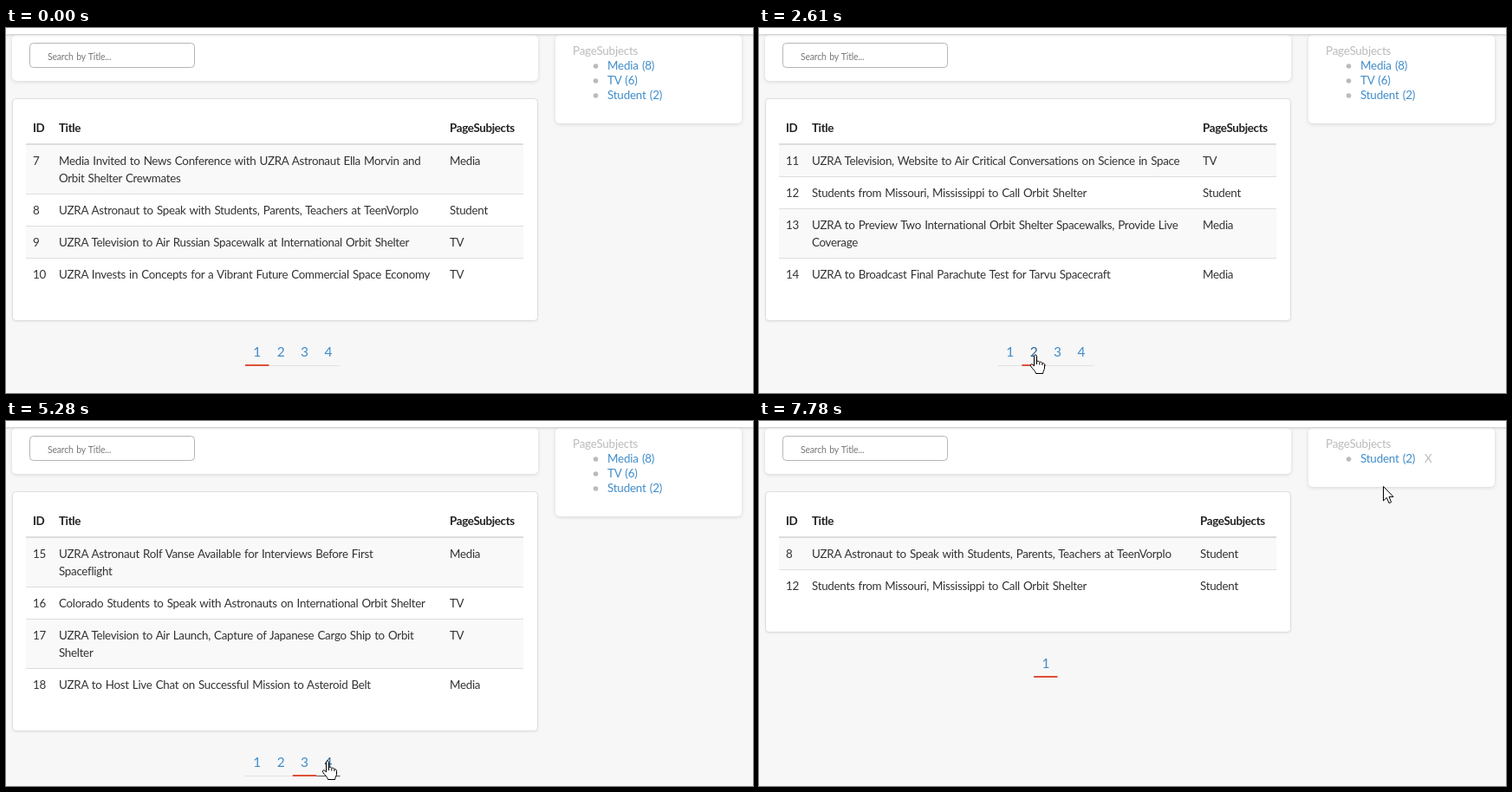
An HTML page that plays this animation: 862x421 px, repeating every 8000 ms.

```html
<!DOCTYPE html>
<html lang="en">
<head>
<meta charset="utf-8">
<title>Paged news table</title>
<style>
html, body { margin: 0; width: 100%; height: 100%; overflow: hidden; background: #f7f7f7; }
svg { display: block; }
text { font: 13.4px Lato, sans-serif; letter-spacing: -.3px; word-spacing: 1px; fill: #333; white-space: pre; }
.head { font-weight: 700; fill: #222; letter-spacing: -.35px; }
.hint { font-size: 10.5px; fill: #777; letter-spacing: -.2px; }
.muted { fill: #bbb; letter-spacing: -.2px; }
.link { fill: #3f8cca; letter-spacing: -.2px; }
.hover { fill: #2a6496; }
.page { font-size: 15.5px; text-anchor: middle; }
.card { fill: #fff; filter: drop-shadow(0 1px 2px #0002); }
.cursor { fill: #fff; stroke: #000; stroke-linejoin: round; }
</style>
</head>
<body>
<svg id="stage" width="862" height="421" viewBox="0 0 862 421"></svg>
<script>
const LOOP = 8000, STEP = 155.5, PER_PAGE = 4;
const stage = document.getElementById('stage');

// Keyword, then title with "|" as line break; ids count up from 7
const news = `
Media: Media Invited to News Conference with UZRA Astronaut Ella Morvin and|Orbit Shelter Crewmates
Student: UZRA Astronaut to Speak with Students, Parents, Teachers at TeenVorplo
TV: UZRA Television to Air Russian Spacewalk at International Orbit Shelter
TV: UZRA Invests in Concepts for a Vibrant Future Commercial Space Economy
TV: UZRA Television, Website to Air Critical Conversations on Science in Space
Student: Students from Missouri, Mississippi to Call Orbit Shelter
Media: UZRA to Preview Two International Orbit Shelter Spacewalks, Provide Live|Coverage
Media: UZRA to Broadcast Final Parachute Test for Tarvu Spacecraft
Media: UZRA Astronaut Rolf Vanse Available for Interviews Before First|Spaceflight
TV: Colorado Students to Speak with Astronauts on International Orbit Shelter
TV: UZRA Television to Air Launch, Capture of Japanese Cargo Ship to Orbit|Shelter
Media: UZRA to Host Live Chat on Successful Mission to Asteroid Belt
TV: UZRA Television to Air Launch of Global Ice-Measuring Satellite
Media: UZRA Invites Media to Witness Final Tarvu Parachute Test in Arizona|Desert
Media: UZRA Invites Media to View Spacecraft to Study the Frontier of Space
Media: UZRA Awards Contract for Earth Science Mission Hosting Services
`.trim().split('\n').map((line, i) => {
  const [keyword, title] = line.split(': ');
  return { id: i + 7, keyword, lines: title.split('|') };
});

const clicks = [
  { at: 0, page: 1 }, { at: 2450, page: 2 }, { at: 3390, page: 3 }, { at: 5590, page: 4 },
  { at: 6520, page: 1 }, { at: 7620, page: 1, keyword: 'Student' }];

// Pointer trips: start, end, destination x, y
const trips = [
  [0, 140, 728, 402], [140, 450, 420, 346], [450, 760, 319, 377],
  [1220, 1560, 364, 369], [1560, 2300, 319, 377], [2610, 3230, 343, 373],
  [3550, 4050, 348, 388], [4210, 5280, 371, 392], [5280, 6050, 291, 371], [6680, 7460, 720, 75]];

const viewAt = t => clicks.findLast(click => click.at <= t);
const smooth = p => p * p * (3 - 2 * p);

function pointerAt(t) {
  const time = 140 + STEP * Math.floor((t - 140) / STEP + .2);
  let x = 728, y = 450;
  for (const [start, end, toX, toY] of trips) {
    const p = smooth(Math.min(1, Math.max(0, (time - start) / (end - start))));
    x += (toX - x) * p;
    y += (toY - y) * p;
  }
  return [Math.round(x), Math.round(y)];
}

const text = (x, y, value, cls = '') => `<text x="${x}" y="${y}" class="${cls}">${value}</text>`;
const rect = (x, y, w, h, attrs) => `<rect x="${x}" y="${y}" width="${w}" height="${h}" ${attrs}/>`;
const card = (x, y, w, h) => rect(x, y, w, h, 'rx="5" class="card"');

function table(rows, keywordX) {
  let y = 134, body = '';
  rows.forEach(({ id, lines, keyword }, i) => {
    const height = 17 + 20 * lines.length;
    if (i % 2 === 0) body += rect(23, y, 574, height, 'fill="#f9f9f9"');
    if (i) body += rect(23, y, 574, 1, 'fill="#ddd"');
    body += text(31, y + 24, id) + text(keywordX, y + 24, keyword);
    lines.forEach((line, n) => body += text(61, y + 24 + 20 * n, line));
    y += height;
  });
  const bottom = y + 36;
  const frame = rect(7.5, 81.5, 606, bottom - 82, 'rx="4" fill="#fff" stroke="#ddd" style="filter:drop-shadow(0 1px 1px #0001)"');
  const head = text(31, 120, 'ID', 'head') + text(61, 120, 'Title', 'head') +
    text(keywordX, 120, 'PageSubjects', 'head');
  return { bottom, svg: frame + head + body + rect(23, 133, 574, 2, 'fill="#ddd"') };
}

function pager(count, active, pressed, bottom, isOver) {
  const width = 27.4, left = 330.8 - count * width / 2;
  let svg = rect(left, bottom + 51, count * width, 1, 'fill="#e2e2e2"'), over = false;
  for (let n = 1; n <= count; n++) {
    const x = left + (n - 1) * width;
    const hover = isOver(x, bottom + 22, width, 30);
    over ||= hover;
    svg += text(x + width / 2, bottom + 41, n, 'page link' + (hover ? ' hover' : ''));
    if (n === active) svg += rect(x, bottom + 50, width, 2, 'fill="#df4f38"');
    else if (hover) svg += rect(x, bottom + 51, width, 1, `fill="${n === pressed ? '#c0695c' : '#555'}"`);
  }
  return { svg, over };
}

function sidebar(keywords, isOver) {
  let over = false;
  let svg = card(634, 8, 215, 51 + 17 * keywords.length) + text(654, 31, 'PageSubjects', 'muted');
  keywords.forEach((keyword, i) => {
    const y = 48 + 17 * i;
    const hover = isOver(694, y - 13, 64, 17);
    const total = news.filter(item => item.keyword === keyword).length;
    over ||= hover;
    svg += `<circle cx="680.5" cy="${y - 4}" r="2.8" fill="#bbb"/>` +
      text(694, y, `${keyword} (${total})`, 'link' + (hover ? ' hover' : ''));
  });
  return { svg, over };
}

function pointer(x, y, hand) {
  const shape = hand
    ? `<path d="M-1.5 1.5C-1.5-.5 1.5-.5 1.5 1.5V8C2 6.8 4.6 7 4.8 8.6 5.6 7.7 7.7 8.2 7.9 9.8 8.8 9.2 10.5 9.8 10.5 11.5V15C10.5 17.5 8.7 18.5 8.7 21.5H.5C.2 18.5-3.5 16.5-5.5 12.8-6.2 11.2-4.5 10-3 11.3L-1.5 13Z"/>
       <path d="M1.5 8V11M4.8 9V11.5M7.9 10V12"/>`
    : '<path d="M.5.5V17L4.3 13.4 7 19.7 9.6 18.6 7 12.4H12Z"/>';
  return `<g class="cursor" transform="translate(${x} ${y})">${shape}</g>`;
}

function draw(t) {
  const { page, keyword } = viewAt(t);
  const pressed = viewAt(t + STEP + 5).page;
  const [px, py] = pointerAt(t);
  const isOver = (x, y, w, h) => px >= x && px < x + w && py >= y && py < y + h;

  const found = news.filter(item => !keyword || item.keyword === keyword);
  const rows = found.slice((page - 1) * PER_PAGE, page * PER_PAGE);
  const grid = table(rows, keyword ? 509 : 512);
  const nav = pager(Math.ceil(found.length / PER_PAGE), page, pressed, grid.bottom, isOver);
  const side = sidebar(keyword ? [keyword] : ['Media', 'TV', 'Student'], isOver);

  return card(7, 8, 607, 53) +
    rect(27.5, 17.5, 190, 28, 'rx="4" fill="#fff" stroke="#b5b5b5"') +
    text(48, 37, 'Search by Title...', 'hint') +
    side.svg + (keyword ? text(768, 48, 'X', 'muted') : '') +
    rect(-5, -5, 872, 12, 'fill="#fff" style="filter:drop-shadow(0 1px 1.5px #0003)"') +
    grid.svg + nav.svg + pointer(px, py, nav.over || side.over);
}

let shown = '';
function tick() {
  const svg = draw(performance.now() % LOOP);
  if (svg !== shown) stage.innerHTML = shown = svg;
  requestAnimationFrame(tick);
}
tick();
</script>
</body>
</html>
```
